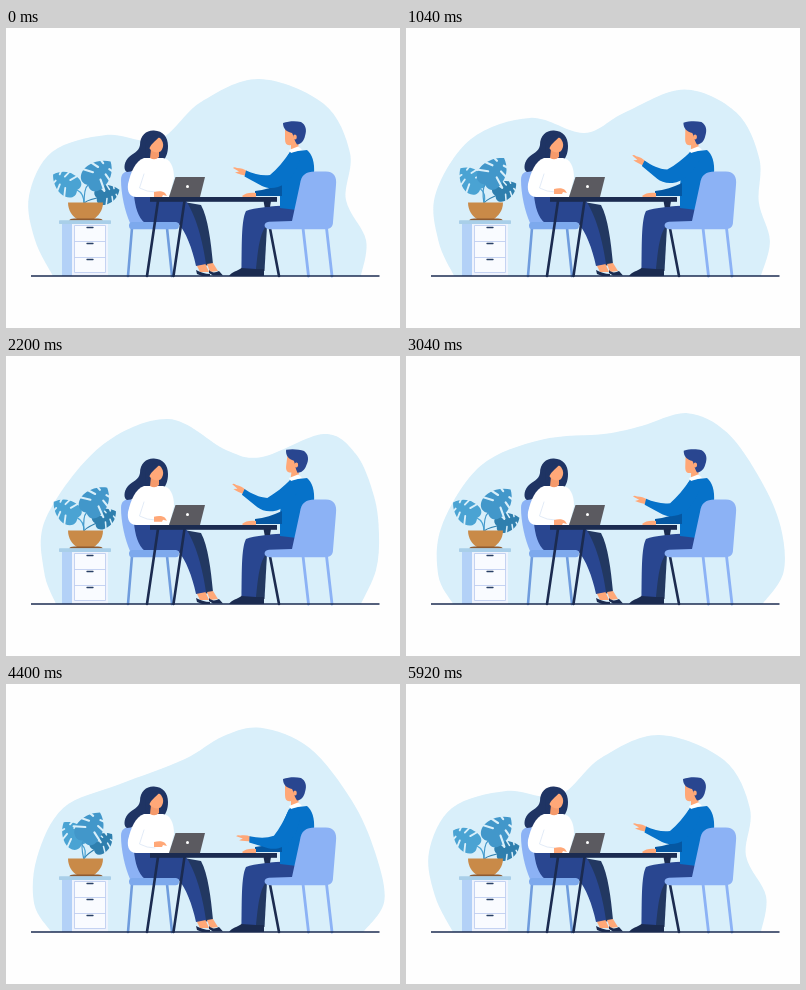
An HTML page for the animation above (6040 ms loop, 394 by 300 pixels).

```html
<!DOCTYPE html>
<html lang="en">
<head>
<meta charset="utf-8">
<title>Meeting at the table</title>
<style>
  html, body { margin: 0; width: 100%; height: 100%; overflow: hidden; background: #fefefe; }
  svg { display: block; width: 100vw; height: 100vh; }
  .skin { fill: #ffa878; }
  .dark { fill: #1b2b50; }
  .hair { fill: #1f3464; }
  .shade { fill: #223861; }
  .navy { fill: #294690; }
  .chair { fill: #8cb2f5; }
  .shirt { fill: #0672c9; }
  .line { fill: none; stroke-linecap: round; }
</style>
</head>
<body>
<svg viewBox="0 0 394 300">
  <defs>
    <path id="notch" d="M7-15L12-5M17-15L19-5M26-10L25-4"/>
    <g id="leaf">
      <path d="M0 0C-5-8 3-15 13-13C22-11 28-5 31 0C27 7 20 12 12 12C3 13-5 8 0 0Z"/>
      <g class="line" stroke="#d9effa" stroke-width="2">
        <use href="#notch"/><use href="#notch" transform="scale(1 -1)"/>
      </g>
    </g>
  </defs>

  <path id="blob" fill="#d9effa"/>

  <g id="plant"></g>
  <path d="M62 174.500H97C97 183 92 188 88 191H71C66 188 62 182 62 174.500Z" fill="#c98a48"/>
  <path d="M63 192.500Q64 190.500 68 190.500H92Q96 190.500 97 192.500Z" fill="#8d5a30"/>

  <g id="cabinet">
    <path d="M56 196H66V248H56Z" fill="#b3d1f7"/>
    <path d="M66 196H102V248H66Z" fill="#eef3fd"/>
    <path d="M68.500 197.500H99.500V244.500H68.500ZM68.500 213.500H99.500M68.500 229.500H99.500" fill="#f9fbff" stroke="#b9caef" stroke-width=".8"/>
    <path d="M81 199.500H87M81 215.500H87M81 231.500H87" class="line" stroke="#294066" stroke-width="1.3"/>
    <rect x="53" y="192.300" width="52" height="3.700" rx=".8" fill="#a9cfe9"/>
  </g>

  <g id="woman">
    <path d="M126 200L122 248M161 200L166 248" class="line" stroke="#6f9cdd" stroke-width="2.600"/>
    <path d="M115 152C115 145 119 143 125 143L138 160V195H124C119 184 115 166 115 152Z" class="chair"/>
    <path d="M134 117C134 107 141 102 148 102.500C157 103 162 109 162 118C162 125 160 129 158 132L143 130C138 137 132 143 121 144C118 143 117 136 122 130C127 125 133 124 134 117Z" class="hair"/>
    <path d="M178 174L195 177C202 190 205 214 207 236L198 238C197 215 188 195 178 174Z" class="shade"/>
    <path d="M190 236L199 235L203 244L194 244ZM201 236L207 235L212 243L204 244Z" class="skin"/>
    <path d="M190 242C194 244 199 246 204 246V248H196L191 246ZM203 242C207 246 210 244 213 243L217 247.500H207L203 245Z" class="dark"/>
    <path d="M128 167L178 170C190 186 197 214 200 236L190 238C186 220 180 204 172 195H139C132 190 129 178 128 167Z" class="navy"/>
    <rect x="123" y="194" width="50" height="7.300" rx="3.500" fill="#7da9ed"/>
    <path d="M138 130C129 133 125 144 122 156C121 164 124 169 130 169H163L168 150C168 138 164 131 157 130Z" fill="#fff"/>
    <path d="M138 146L133.500 160Q141 164 149 164" class="line" stroke="#dbe6f5" stroke-width=".8"/>
    <path d="M145 121H153V129Q149 133 144 130Z" fill="#f59a6b"/>
    <path d="M143 114C144 110 150 108 154 110C158 114 158 119 155 123C151 126 146 124 143 120Z" class="skin"/>
    <path d="M139 123C139 111 144 106 154 108C150 113 144 116 143 122L140 129Z" class="hair"/>
    <path id="typing" d="M148 164C152 163 157 163 159 165L161 168L157 167L156 169H148Z" class="skin"/>
  </g>

  <path d="M259 174L273 248" class="line" stroke="#1b2b50" stroke-width="2.600"/>

  <g id="man">
    <path d="M297 200L302.500 248M320.500 200L326 248" class="line" stroke="#8cb2f5" stroke-width="2.800"/>
    <path d="M250 198H261L258.500 243H247Z" class="shade"/>
    <path d="M234 248Q239 244 245 241H258V248Z" class="dark"/>
    <path d="M223 248C225 244 232 243 236 239.500L249 240V248Z" class="dark"/>
    <path d="M240 183C250 179 275 177 290 178V196H262C253 204 252 224 250 241L235.500 240C236 220 235 192 240 183Z" class="navy"/>
    <path d="M284 124C278 133 275 146 274 158V180L291 182L297 155L308 146C309 134 306 126 301 122Z" class="shirt"/>
    <path d="M249 163C258 162 268 159 276 155V168H249Z" fill="#0557a2"/>
    <path d="M236 168C239 165 245 164 250 165V169H237Z" class="skin"/>
    <g id="arm">
      <path d="M241 148C237 147 232 146 229 144.500L233 143.500L227 140Q228 138.500 231 140C235 140 238 141 241 143Z" class="skin"/>
      <path d="M240 142.500C248 146 256 148 264 147C271 141 278 133 284 124L294 132C290 145 282 156 272 159C266 161 260 160 256 158L238.500 148.500Z" class="shirt"/>
    </g>
    <g id="head">
      <path d="M279 101L289 102L293 113L292 121L285 123L285 117C281 118 279 116 279 111Z" class="skin"/>
      <path d="M277 95C283 93 290 93 295 94C300 97 301 102 299 108C298 113 295 116 291 116.500C288 112 288 108 286 105C281 104 277 101 277 95Z" class="navy"/>
      <ellipse cx="289" cy="109" rx="1.800" ry="2.500" class="skin"/>
    </g>
    <path d="M283 122L292 118.500L296 121.500L285 125Z" fill="#fff"/>
    <path d="M294 156C295 147 300 143.500 309 143.500H320C328 143.500 331 149 330 157L327 194C327 199 324 201.300 319 201.300H264C257 201 257 194 263 193.700L286 193Z" class="chair"/>
  </g>

  <g id="table">
    <path d="M152 173L141 248M178.500 173L167.500 248" class="line" stroke="#1b2b50" stroke-width="2.600"/>
    <path d="M259 173H265L264 179H260Z" class="dark"/>
    <rect x="144" y="169" width="127" height="4.800" class="dark"/>
    <path d="M169.500 149H199L194 169H163Z" fill="#5b5a60"/>
    <circle cx="181.500" cy="158.500" r="1.500" fill="#fff"/>
  </g>
  <path d="M25 248H373.500" stroke="#1b2b50" stroke-width="1.400"/>
</svg>

<script>
const LOOP = 6040, STEP = 40, START = 240, END = 5920;
const $ = id => document.getElementById(id);

// The backdrop morphs through three outlines, each from bottom left to bottom right.
const outlines = [
  "47,248 29,212 23,168 46,124 100,107 152,112 195,74 253,51 318,76 344,125 340,172 360,212 355,248",
  "50,248 38,215 40,162 94,91 162,63 220,94 256,101 318,78 350,98 368,140 373,178 370,214 355,248",
  "45,248 28,222 33,175 60,124 116,99 185,66 222,47 255,42 300,61 346,114 376,166 383,218 358,248"
].map(text => text.split(" ").map(pair => pair.split(",").map(Number)));
const morphTimes = [200, 2160, 3760, END];

const leaves = [
  { base: [91, 170], turn: -20, size: .77, color: "#2f7fae", sway: -24, peak: .54, power: 4 },
  { base: [71, 162], turn: 213, size: .92, color: "#4aa3d3", sway: 18, peak: .45, power: 6 },
  { base: [82, 157], turn: -46, size: 1.05, color: "#4297ca", sway: -14, peak: .5, power: 4 }
];
const ROOT = [78, 176];

$("plant").innerHTML = leaves.map(({ base: [x, y], turn, size, color }) =>
  `<g><path d="M${ROOT}Q${ROOT[0]} ${y + 3} ${x} ${y}" class="line" stroke="${color}" stroke-width="1.2"/>
   <use href="#leaf" transform="translate(${x} ${y}) rotate(${turn}) scale(${size})" fill="${color}"/></g>`).join("");

const ease = u => (1 - Math.cos(Math.PI * Math.min(1, Math.max(0, u)))) / 2;

// Smooth bump once per cycle, highest at the given phase.
const bump = (phase, peak, power) => Math.abs(Math.cos(Math.PI * (phase - peak))) ** power;

const rotate = (node, angle, [x, y]) =>
  node.setAttribute("transform", `rotate(${angle} ${x} ${y})`);

// Catmull-Rom curve through the points as a Bézier path.
function smooth(pts) {
  let d = `M${pts[0]}`;
  for (let k = 0; k < pts.length - 1; k++) {
    const p = pts[k], q = pts[k + 1];
    const before = pts[k - 1] || p, after = pts[k + 2] || q;
    const c1 = p.map((a, n) => a + (q[n] - before[n]) / 6);
    const c2 = q.map((a, n) => a - (after[n] - p[n]) / 6);
    d += `C${c1} ${c2} ${q}`;
  }
  return d + "Z";
}

function blobPath(t) {
  const i = t < morphTimes[1] ? 0 : t < morphTimes[2] ? 1 : 2;
  const u = ease((t - morphTimes[i]) / (morphTimes[i + 1] - morphTimes[i]));
  const next = outlines[(i + 1) % outlines.length];
  return smooth(outlines[i].map((p, k) => p.map((a, n) => a + (next[k][n] - a) * u)));
}

function draw(now) {
  let t = Math.floor(now % LOOP / STEP) * STEP;
  if (t < START || t >= END) t = 0;
  const turn = t / LOOP;

  $("blob").setAttribute("d", blobPath(t));
  leaves.forEach(({ sway, peak, power }, i) =>
    rotate($("plant").children[i], sway * bump(2 * turn, peak, power), ROOT));
  $("typing").setAttribute("transform", `translate(0 ${-7 * bump(2 * turn, .54, 4)})`);
  rotate($("head"), 7 * bump(turn, .35, 12), [289, 120]);
  rotate($("arm"), 11.5 * Math.sin(Math.PI / 2 * Math.sin(2 * Math.PI * turn)), [290, 130]);
}

let origin;
function tick(now) {
  origin ??= now;
  draw(now - origin);
  requestAnimationFrame(tick);
}
draw(0);
requestAnimationFrame(tick);
</script>
</body>
</html>
```
